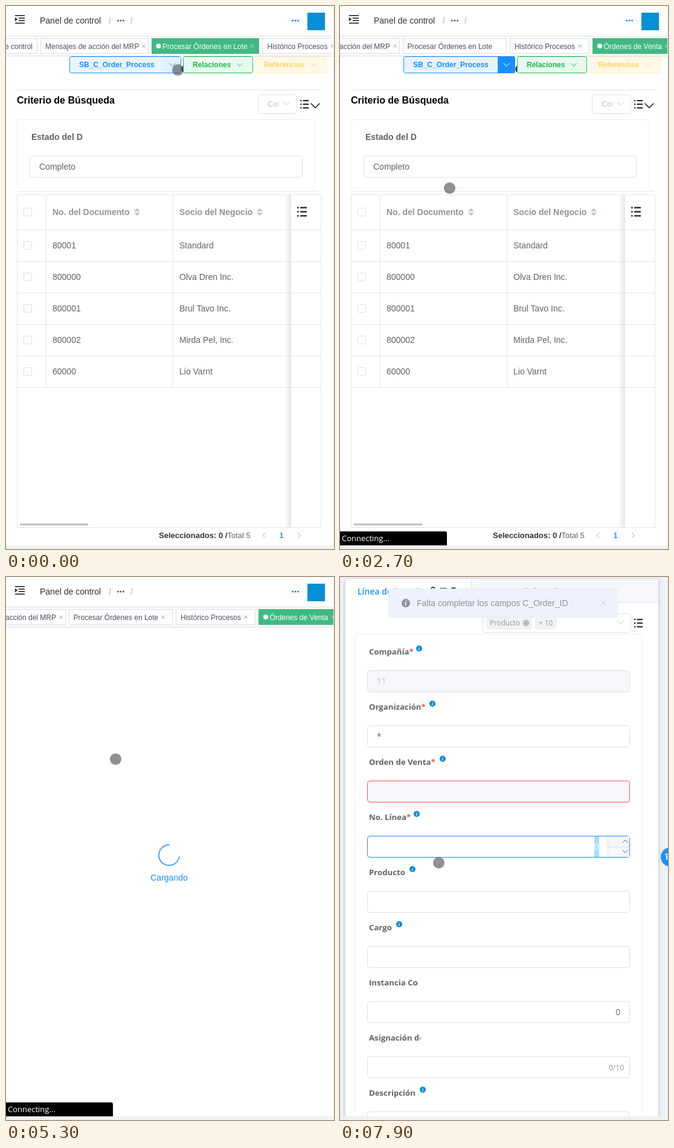
An HTML page that plays this animation: 543x896 px, repeating every 8 s.

```html
<!DOCTYPE html>
<html lang="es">
<head>
<meta charset="utf-8">
<title>Panel de control</title>
<style>
html, body { margin: 0; width: 100%; height: 100%; overflow: hidden; background: #fff; }
svg { display: block; }
text { white-space: pre; font-family: "Liberation Sans", Arial, sans-serif; }
text.u { font-family: "Open Sans", "Noto Sans", sans-serif; }
#menuBox { filter: drop-shadow(0 2px 5px rgba(0, 0, 0, .14)); }
.panel { filter: drop-shadow(0 0 3px rgba(0, 0, 0, .22)); }
</style>
</head>
<body>
<svg id="stage" width="543" height="896" viewBox="0 0 543 896"></svg>
<script>
const BLUE = '#1890ff', GREEN = '#1fb84c', YELLOW = '#ffd566', RED = '#f5544e';
const TEXT = '#606266', MUTED = '#909399', PALE = '#c0c4cc', LINE = '#dcdfe6', GRID = '#dfe6ec', SOFT = '#ebeef5', FILL = '#f5f7fa';

// Shape helpers; outlined boxes sit on half pixels.
const rect = (x, y, w, h, fill, extra = '') => `<rect x="${x}" y="${y}" width="${w}" height="${h}" fill="${fill}" ${extra}/>`;
const box = (x, y, w, h, stroke, fill = '#fff', r = 4) =>
  rect(x + .5, y + .5, w - 1, h - 1, fill, `stroke="${stroke}" rx="${r}"`);
const path = (d, stroke, w = 1, fill = 'none') =>
  `<path d="${d}" fill="${fill}" stroke="${stroke}" stroke-width="${w}" stroke-linecap="round" stroke-linejoin="round"/>`;
const line = (d, stroke = LINE) => `<path d="${d}" stroke="${stroke}" fill="none"/>`;
const dot = (x, y, r, fill) => `<circle cx="${x}" cy="${y}" r="${r}" fill="${fill}"/>`;
const text = (x, y, s, size = 14, fill = TEXT, extra = '') =>
  `<text x="${x}" y="${y}" font-size="${size}" fill="${fill}" ${extra}>${s}</text>`;
const bold = (x, y, s, size, fill, extra = '') => text(x, y, s, size, fill, 'font-weight="700" ' + extra);
const END = 'text-anchor="end"', MID = 'text-anchor="middle"', U = 'class="u"';
const group = (id, body) => `<g id="${id}">${body}</g>`;
const clip = (right, bottom, body) => `<svg width="${right}" height="${bottom}">${body}</svg>`;

const down = (x, y, c, w = 4.5, lw = 1) => path(`M${x - w} ${y - w / 2}l${w} ${w}l${w} ${-w}`, c, lw);
const up = (x, y, c, w = 4) => path(`M${x - w} ${y + w / 2}l${w} ${-w}l${w} ${w}`, c);
const cross = (x, y, c, r = 2.3) => path(`M${x - r} ${y - r}l${2 * r} ${2 * r}m0 ${-2 * r}l${-2 * r} ${2 * r}`, c, .9);
const dots = (x, y, c) => [0, 4.5, 9].map(d => dot(x + d, y, 1.6, c)).join('');
const list = (x, y, s = 1, c = '#303133') => [0, 6, 12].map(d =>
  rect(x, y + d * s, 2.4 * s, 2.2 * s, c) + rect(x + 4.4 * s, y + d * s, 10 * s, 2.2 * s, c, 'rx="1"')).join('');
const info = (x, y, r = 5, c = '#0a8ad6') => dot(x, y, r, c) +
  `<text x="${x}" y="${y + r * .62}" font-size="${r * 1.7}" fill="#fff" font-weight="700" font-style="italic" ${MID} style="font-family:'Liberation Serif',serif">i</text>`;

function tabIcons(x, y) {
  return rect(x - 5, y - 1, 10, 7, 'none', 'stroke="#111" stroke-width="1.4" rx="1"') +
    path(`M${x - 3} ${y - 1}v-2a3 3 0 0 1 6 0v2M${x} ${y + 2}v1.5`, '#111', 1.3) +
    path(`M${x + 12} ${y - 4}h10M${x + 14} ${y}h8M${x + 12} ${y + 4}h10`, '#111', 1.6) +
    path(`M${x + 27} ${y}q7 -10 14 0q-7 10 -14 0z`, '#111', 1.3) +
    `<circle cx="${x + 34}" cy="${y}" r="2.2" fill="none" stroke="#111" stroke-width="1.2"/>`;
}

// Tab entry: left, right, label x, label, close x
function tab([l, r, x, label, close], on) {
  const c = on ? '#fff' : '#495060';
  return box(l, 53, r - l, 26, on ? '#42b983' : '#d8dce5', on ? '#42b983' : '#fff', 0) +
    (on ? dot(x - 6.5, 66, 4, '#fff') : '') + text(x, 71, label, 12, c) +
    (close ? cross(close, 66.3, on ? '#cdebdd' : '#888d96') : '');
}

function header() {
  return rect(0, 0, 543, 83, '#fff') +
    path('M15.5 15.7h15M21.5 20h9M21.5 24h9M15.5 28.3h15', '#111', 1.6) +
    path('M15.5 19.5l3 2.5l-3 2.5z', '#111', .8, '#111') +
    text(56, 29, 'Panel de control', 14, '#303133') +
    bold(170, 29, '/', 14, PALE) + dots(185.5, 24, TEXT) + bold(206, 29, '/', 14, PALE) +
    dots(474.5, 24, BLUE) + rect(499, 11, 29, 29, '#0490d6') +
    rect(0, 48, 543, 2, '#f4f5f7') + line('M0 50.5H543', '#e9ebee') + line('M0 82.5H543', '#d3d7e0') +
    group('tabsA', tab([-20, 52, -26, 'Panel de control', 0]).replace('x="-26"', `x="44" ${END}`) +
      tab([57, 236, 65, 'Mensajes de acción del MRP', 228]) +
      tab([241, 419, 259, 'Procesar Órdenes en Lote', 407], 1) +
      tab([424, 560, 432.5, 'Histórico Procesos', 541])) +
    group('tabsB', tab([-80, 99, -72, 'Mensajes de acción del MRP', 91]).replace('x="-72"', `x="83" ${END}`) +
      tab([104, 276, 111.5, 'Procesar Órdenes en Lote', 0]) + group('lateClose', cross(260, 66.3, '#888d96')) +
      tab([281, 413, 289, 'Histórico Procesos', 397]) +
      tab([418, 560, 436.5, 'Órdenes de Venta', 541], 1));
}

function listPage() {
  const rows = [['80001', 'Standard'], ['800000', 'Olva Dren Inc.'], ['800001', 'Brul Tavo Inc.'],
    ['800002', 'Mirda Pel, Inc.'], ['60000', 'Lio Varnt']];
  const sort = x => path(`M${x - 4.5} 338.5l4.5 -4.5l4.5 4.5zM${x - 4.5} 341.5l4.5 4.5l4.5 -4.5z`, PALE, .6, PALE);
  const check = y => box(29, y - 7, 14, 14, LINE, '#fff', 2);
  let s = rect(0, 83, 542, 807, '#fff') + path('M293 100q-3 4 0 8', '#111', 2) +
    box(105, 83, 185, 28, BLUE, '#e8f4ff', 3) + rect(262, 84, 27, 26, '#e1f0ff') +
    group('hot', path('M262 83.5h25a2.5 2.5 0 0 1 2.5 2.5v22a2.5 2.5 0 0 1 -2.5 2.5h-25z', BLUE, 1, BLUE)) +
    bold(121, 101, 'SB_C_Order_Process', 12, BLUE) +
    `<g id="arrow" stroke="${BLUE}">${down(275.5, 97, 'inherit')}</g>` +
    box(293, 83, 116, 28, GREEN, '#e7faf0', 3) + bold(309, 101, 'Relaciones', 12, GREEN) + down(387, 97, GREEN) +
    box(412, 83, 120, 28, '#fff1cf', '#fff8e6', 3) + bold(427, 101, 'Referencias', 12, YELLOW) + down(510, 97, YELLOW) +
    line('M18 138.5H522') + bold(18, 161, 'Criterio de Búsqueda', 16, '#000') +
    box(417, 146, 65, 32, LINE) + clip(451, 180, text(433, 166, 'Columnas', 13, PALE)) + down(464.5, 161, PALE, 5) +
    list(487, 155) + down(512, 164.5, '#222', 7, 1.6) +
    box(18, 187, 494, 113, SOFT) + bold(42, 221, 'Estado del D') + box(39, 247, 452, 36, LINE) + text(55, 270, 'Completo') +
    line('M18 305.5H522M18.5 860V311.5H521.5V860M18 860.5H522M66.5 311V629M276.5 311V629', GRID) +
    check(340) + bold(77, 345, 'No. del Documento', 14, MUTED) + sort(217) +
    bold(287, 345, 'Socio del Negocio', 14, MUTED) + sort(420);
  rows.forEach(([id, name], i) => {
    const y = 395 + 52 * i;
    s += check(y) + text(77, y + 5, id) + text(287, y + 5, name);
  });
  s += rect(461, 312, 11, 548, 'url(#edge)') + rect(472, 312, 49, 548, '#fff') + list(482, 331.5, 1.13);
  for (let i = 0; i < 6; i++) s += line(`M18 ${369.5 + 52 * i}H522`, GRID);
  return s + rect(23, 854, 113, 3, '#bcbfc4') +
    bold(253, 878, 'Seleccionados: 0 /', 13, '#303133') + text(366.5, 878, 'Total 5', 13) +
    path('M429 869.5l-4 4l4 4M483.500 869.5l4 4l-4 4', '#a0a4ab') + bold(456, 878, '1', 12, BLUE, MID);
}

function menu() {
  // Item: title lines, first baseline, note lines, first note baseline, divider y
  const items = [
    [['SB_C_Order_Process'], 145, ['Sin Descripción'], 160, 166, 1],
    [['Eliminar'], 183, ['Sin Descripción'], 198, 204, 1],
    [['Exportar Registros', 'Seleccionados'], 220, ['Sin Descripción'], 247, 253],
    [['Refrescar Registros'], 270, ['Sin Descripción'], 285, 291],
    [['Acercar Ventana: Sales', 'Order'], 308, ['Enter and change sales orders'], 335, 341],
    [['Compartir Enlace'], 358, ['Compartir ruta actual en el porta-', 'papeles'], 373, 0]];
  let s = '';
  for (const [title, y, note, ny, rule, off] of items) {
    title.forEach((t, i) => s += bold(108, y + 14 * i, t, 14, off ? PALE : TEXT));
    note.forEach((t, i) => s += text(108, ny + 14 * i, t, 12, off ? PALE : TEXT));
    if (rule) s += line(`M71 ${rule + .5}H289`, SOFT);
  }
  let gear = '';
  for (let i = 0; i < 16; i++) {
    const a = (i + .5) * Math.PI / 8, r = (i >> 1) % 2 ? 6.2 : 8;
    gear += `${i ? 'L' : 'M'}${(90.5 + r * Math.cos(a)).toFixed(1)} ${(145 + r * Math.sin(a)).toFixed(1)}`;
  }
  return group('menuBox', path('M191 125.5l6 -5l6 5', SOFT, 1, '#fff') + box(70, 125, 220, 261, SOFT)) +
    path('M192 125.7h10', '#fff', 1) + clip(289, 385, s) + down(275, 243, TEXT, 5, 1.2) +
    path(gear + 'z', '#b4b7bd', 1.5) + `<circle cx="90.500" cy="145" r="3.5" fill="none" stroke="#b4b7bd" stroke-width="1.5"/>` +
    path('M83 178h15M88 178v-3h5v3M85 178v12.500h11.500v-12.500M89 182v5M92.500 182v5', '#b4b7bd', 1.5) +
    path('M90.500 213v9M86 218.500l4.500 4.500l4.500 -4.500M83.500 224v3h14v-3', '#b4b7bd', 1.5) +
    path('M84 268a6.500 6.500 0 0 1 12 -1M97 272a6.500 6.500 0 0 1 -12 1.500M84 263.500v4.500h4M97 276.500v-4.500h-4', TEXT, 1.8) +
    `<circle cx="89.500" cy="306.500" r="6.500" fill="none" stroke="${TEXT}" stroke-width="1.6"/>` +
    path('M94.500 311.500l3.500 3.500M89.500 303.500v6M86.500 306.500h6', TEXT, 1.6) +
    path('M94.500 353.500l-8 5l8 4.500', TEXT, 1.5) + dot(95, 353.5, 2.7, TEXT) + dot(86, 358.5, 2.7, TEXT) + dot(95, 363, 2.7, TEXT);
}

// Form field: label, centre y, icon x, required, clip x, input outline, value, value colour, disabled
function field([label, y, ix, must, cut, edge, value, color = TEXT, off]) {
  const t = bold(48, y + 5, label + (must ? `<tspan fill="${RED}">*</tspan>` : ''), 13.2, TEXT, U);
  return (cut ? clip(cut, 896, t) : t) + (ix ? info(ix, y - 5) : '') +
    (edge ? box(45, y + 31, 435, 36, edge, off ? FILL : '#fff') : '') +
    (value ? text(61, y + 54, value, 13.6, color, U) : '');
}
const tag = (x, y, w, s, close) => box(x, y, w, 20, '#e6e8ec', '#f2f3f5', 3) + text(x + 6, y + 14, s, 11.7, MUTED, U) +
  (close ? dot(close, y + 10, 5.7, PALE) + cross(close, y + 10, MUTED, 2) : '');
const formBase = top => rect(0, 0, 543, 890, '#eef1f5') + rect(9, top, 518, 900, '#fff', 'class="panel"');

function orderForm() {
  return formBase(92) + rect(145, 92, 382, 38, FILL) + line('M144.5 92V130.5H527', '#dfe3ec') +
    text(29, 117, 'Orden', 14, BLUE, U + ' font-weight="600"') + tabIcons(82, 111.500) +
    box(144, 87, 149, 28, BLUE, '#e8f4ff', 3) + line('M264.5 88V114', '#9fd0ff') +
    bold(160, 104, 'Nuevo Registro', 11.6, BLUE, U) + down(278, 100, BLUE) +
    box(296, 87, 113, 28, GREEN, '#e7faf0', 3) + bold(311.5, 104, 'Relaciones', 11.6, GREEN, U) + down(388, 100, GREEN) +
    rect(412, 86, 120, 29, '#fff8e6') + bold(428, 104, 'Referencias', 11.6, YELLOW, U) +
    `<circle cx="511" cy="100" r="4" fill="none" stroke="${YELLOW}" stroke-width="3" stroke-dasharray="1 2.14"/>` +
    box(236, 146, 246, 58, LINE) + tag(242, 151, 214, 'Referencia de Orden de Socio d…', 447) + tag(242, 177, 35, '+ 18') +
    down(464.5, 174, PALE, 5) + list(487, 157) + box(24, 204, 477, 720, SOFT) +
    [['Compañía', 233, 131, 1, 0, RED, 'VelmoTarnic', PALE, 1],
     ['Organización', 324, 153, 1, 0, RED, 'Fertilizer'],
     ['No. del Documento', 415, 193, 1],
     ['Referencia de Orden', 476, 0, 0, 151],
     ['Descripción', 537, 137],
     ['Tipo Documento', 598, 0, 0, 141, RED, 'Orden Estandar'],
     ['Auto-Servicio', 689, 157, 1],
     ['Fecha de la Orden', 750, 185, 1],
     ['Socio del Negocio', 811, 185, 1, 0, RED, 'Velk Edificación']].map(field).join('');
}

function lineForm() {
  return formBase(3) + rect(0, 0, 543, 2, '#eef1f5') + line('M9 2.5H527', '#cfd3da') +
    rect(217, 3, 310, 40, FILL) + line('M217.5 3V42.5H527', '#dfe3ec') +
    text(29, 29, 'Línea de la Orden', 14, BLUE, U + ' font-weight="600"') + tabIcons(154, 23) +
    text(238, 29, 'Impuesto de la Orden', 13.6, '#303133', U) +
    box(236, 60, 246, 32, LINE) + tag(242, 66, 75, 'Producto', 308) + tag(323, 66, 35, '+ 10') +
    down(464.5, 75, PALE, 5) + list(487, 69) + box(24, 94, 477, 830, SOFT) +
    [['Compañía', 131, 1, 0, LINE, '11', PALE, 1],
     ['Organización', 153, 1, 0, LINE, '*'],
     ['Orden de Venta', 170, 1, 0, RED, '', '', 1],
     ['No. Línea', 127, 1, 0, BLUE],
     ['Producto', 120, 0, 0, LINE],
     ['Cargo', 98, 0, 0, LINE],
     ['Instancia Conjunto', 0, 0, 128.5, LINE],
     ['Asignación de Recurso', 0, 0, 133, LINE],
     ['Descripción', 137, 0, 0, LINE]].map(([label, ...rest], i) => field([label, 123 + 91 * i, ...rest])).join('') +
    rect(421, 428, 8, 34, '#a9dcf7') + text(425, 450, '0', 13.6, '#fff', U + MID.padStart(22)) +
    rect(444, 428, 35, 34, FILL) + line('M443.5 428V462M444 445.5H479') + up(472, 436, TEXT) + down(472, 453, TEXT, 4) +
    text(464, 723, '0', 13.6, TEXT, `${U} ${END}`) + text(470, 814, '0/10', 12, MUTED, `${U} ${END}`);
}

const $ = id => document.getElementById(id);
$('stage').innerHTML =
  `<defs><linearGradient id="edge"><stop stop-color="#000" stop-opacity="0"/><stop offset="1" stop-color="#000" stop-opacity=".1"/></linearGradient></defs>` +
  rect(0, 0, 543, 896, '#fff') +
  group('listPage', listPage()) +
  group('loader', '<path id="arc" fill="none" stroke="#409eff" stroke-width="1.8" stroke-linecap="round"/>' + text(270, 501, 'Cargando', 14, BLUE, MID)) +
  group('order', orderForm()) + group('lines', lineForm()) + group('head', header()) + group('menu', menu()) +
  line('M542.5 0V890', '#eff0f2') +
  group('knob', dot(546.5, 462, 15.5, BLUE) + path('M538 457.500h6M540.500 457.500v8h4M540.500 461.500h4', '#fff', 1.4)) +
  group('toast', box(80, 19, 380, 48, '#e6ebf6', '#edf2fc') + info(109, 43, 7, MUTED) +
    text(127, 48, 'Falta completar los campos C_Order_ID', 14, MUTED) + cross(436, 43, PALE, 4.5)) +
  rect(0, 890, 543, 6, '#f1f1f2') +
  group('status', path('M0 867h174q3 0 3 3v20h-177z', 'none', 0, '#000') + text(3, 883, 'Connecting...', 13, '#fff', U)) +
  '<circle id="cursor" r="9.5" fill="#47474a" fill-opacity=".6"/>';

const LOOP = 8000, STEP = 100;
const mouse = [[0, 284.5, 105.5], [100, 285.5, 104.5], [300, 285, 104], [500, 283.5, 103], [600, 282, 102],
  [1300, 282, 102], [1400, 283, 100], [1600, 250, 190], [1800, 206.5, 296.5], [1900, 206.5, 296.5],
  [2000, 199, 304], [2100, 180, 311], [2200, 181.5, 300.5], [5700, 181.5, 300.5], [5800, 233.5, 263],
  [7400, 233.5, 262.5], [7900, 163.5, 471.5]];
// Spinner: time, tail angle, head angle
const spin = [[3300, 0, 3], [3500, 52, 91], [3900, 220, 463], [4200, 295, 522], [4600, 539, 594], [4790, 614, 630],
  [4800, 270, 273], [5300, 370, 630], [5400, 370, 630], [5500, 450, 630], [5700, 450, 630], [5800, 455, 630],
  [5900, 455, 630], [6000, 510, 630], [6100, 510, 630], [6200, 575, 630], [6300, 575, 630], [6400, 585, 630], [6600, 597, 630]];

function at(keys, t) {
  const i = keys.findIndex(k => k[0] > t);
  if (i === 0) return keys[0].slice(1);
  if (i < 0) return keys[keys.length - 1].slice(1);
  const a = keys[i - 1], b = keys[i], p = (t - a[0]) / (b[0] - a[0]);
  return [1, 2].map(n => a[n] + (b[n] - a[n]) * p);
}
const ease = (t, from, ms) => {
  const p = Math.min(1, Math.max(0, (t - from) / ms));
  return 1 - (1 - p) ** 2;
};
function show(id, on, opacity = 1, transform = '') {
  const e = $(id);
  e.style.display = on ? '' : 'none';
  e.setAttribute('opacity', opacity);
  e.setAttribute('transform', transform);
}

function draw(t) {
  const leave = ease(t, 2700, 500), enter = ease(t, 3350, 450), open = ease(t, 800, 400), drop = ease(t, 7300, 300);
  show('listPage', t < 3300, 1 - leave, `translate(${30 * leave} 0)`);
  show('hot', t >= 900);
  $('arrow').setAttribute('stroke', t >= 900 ? '#fff' : BLUE);
  show('menu', t >= 900 && t < 2700, open, `translate(0 ${121 * (1 - open)}) scale(1 ${open})`);
  show('tabsA', t < 2700);
  show('tabsB', t >= 2700);
  show('lateClose', t >= 2800);
  show('head', t < 7600);
  show('loader', t >= 3300 && t < 6800, enter, `translate(${30 * enter - 30} 0)`);
  show('order', t >= 6800 && t < 7600);
  show('lines', t >= 7600);
  show('knob', t >= 6800);
  show('toast', t > 7300, drop, `translate(0 ${48 * drop - 48})`);
  show('status', t >= 2700 && t < 3200 || t >= 5300 && t < 5800);

  const [tail, tip] = at(spin, t);
  const point = d => `${270 + 17 * Math.cos(d * Math.PI / 180)} ${459 + 17 * Math.sin(d * Math.PI / 180)}`;
  $('arc').setAttribute('d', `M${point(tail)}A17 17 0 ${tip - tail > 180 ? 1 : 0} 1 ${point(tip)}`);
  const [x, y] = at(mouse, t);
  $('cursor').setAttribute('cx', x);
  $('cursor').setAttribute('cy', y);
}

function tick() {
  draw(Math.floor(performance.now() % LOOP / STEP) * STEP);
  requestAnimationFrame(tick);
}
tick();
</script>
</body>
</html>
```
